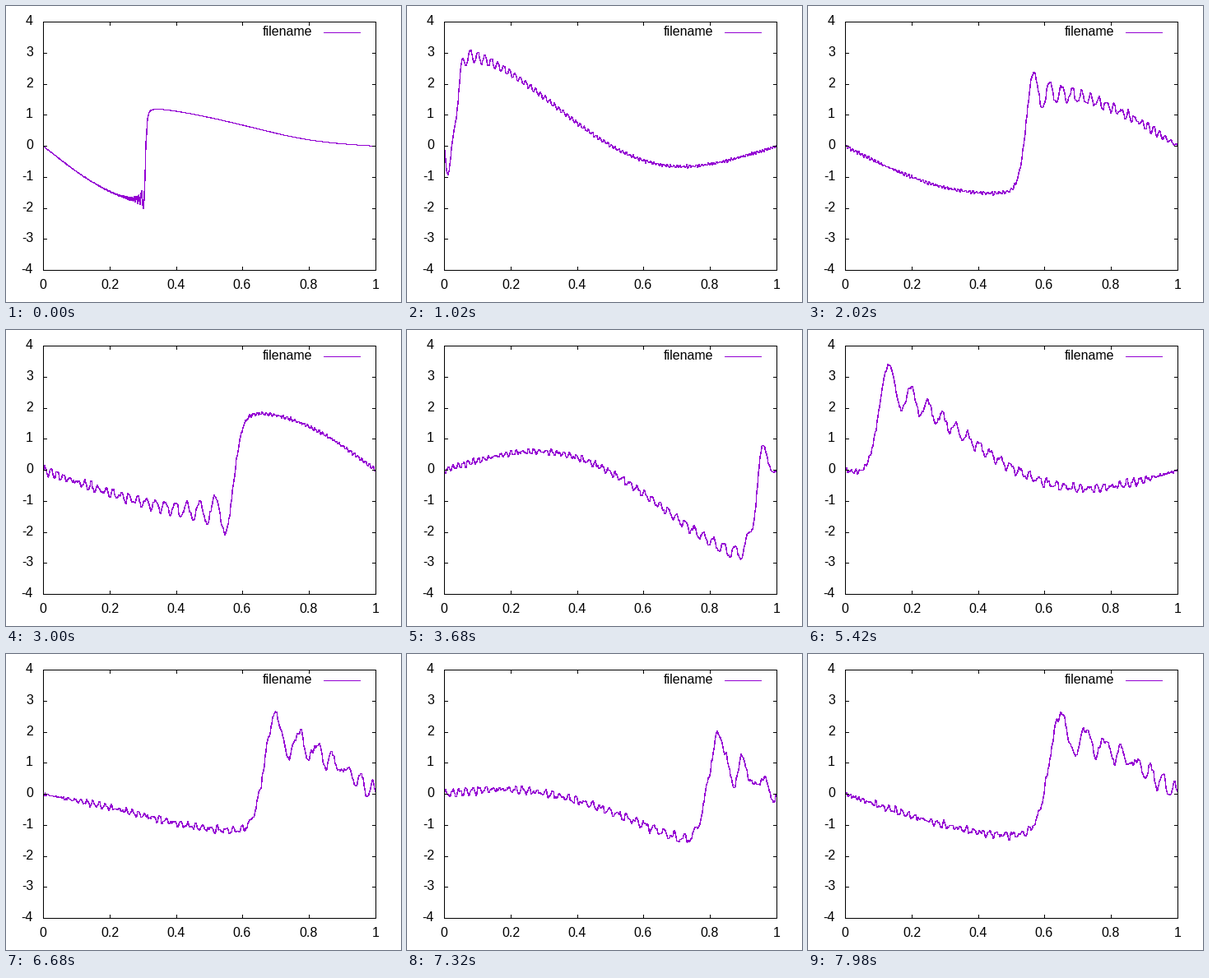
Animation, 480 px wide and 360 px high, one loop 8 s. Source, as a matplotlib script:

```python
import numpy as np
import matplotlib.pyplot as plt
from matplotlib.animation import FuncAnimation
from matplotlib.collections import LineCollection

W, H, DPI = 480, 360, 100
FRAMES, INTERVAL = 400, 20
LEFT, RIGHT, TOP, BOTTOM = 45, 449, 19, 321
PX = 72 / DPI  # one pixel in points
PURPLE = "#9400d3"

plt.rcParams["font.family"] = "Liberation Sans"
plt.rcParams["font.size"] = 16 * PX
plt.rcParams["path.simplify"] = False

# String fixed at both ends, released from rest, on a leapfrog grid.
CELLS = 1000
COURANT = 0.36
SPEED = 0.30852  # string lengths travelled per frame
SOFT = 0.0013    # softens the step at the left end

x = np.arange(CELLS + 1) / CELLS
n = np.arange(1, CELLS)
inner = x[1:-1]
modes = np.sin(np.pi * np.outer(n, inner))
start = np.sin(2 * np.pi * inner) / (2 * (inner + SOFT))
amps = 2 / CELLS * modes @ start
steps = SPEED * CELLS / COURANT
omega = 2 * steps * np.arcsin(COURANT * np.sin(np.pi * n / (2 * CELLS)))


def to_px(v):
    return LEFT + (RIGHT - LEFT) * v


def to_py(v):
    return BOTTOM - (BOTTOM - TOP) * (v + 4) / 8


def center(v):
    """Centre of the nearest pixel."""
    return np.floor(np.asarray(v) + 0.5) + 0.5


def shape(t):
    u = np.zeros(CELLS + 1)
    u[1:-1] = (amps * np.cos(omega * t)) @ modes
    return u


fig = plt.figure(figsize=(W / DPI, H / DPI), dpi=DPI, facecolor="white")
ax = fig.add_axes([0, 0, 1, 1])
ax.set_xlim(0, W)
ax.set_ylim(H, 0)
ax.axis("off")

l, r, t, b = (v + 0.5 for v in (LEFT, RIGHT, TOP, BOTTOM))
border = [[(l, t), (r, t), (r, b), (l, b), (l, t), (r, t)]]

for k in range(6):
    px = float(center(to_px(k / 5)))
    border += [[(px, b), (px, b - 4.5)], [(px, t), (px, t + 4.5)]]
    ax.text(px - 0.5, 344, f"{k / 5:g}", ha="center", va="baseline")

for v in range(-4, 5):
    py = float(center(to_py(v)))
    border += [[(l, py), (l + 4.5, py)], [(r, py), (r - 4.5, py)]]
    ax.text(33, py + 3.5, str(v), ha="right", va="baseline")

lines = LineCollection(border, colors="black", linewidths=PX,
                       antialiaseds=False, zorder=3)
lines.set_snap(False)
ax.add_collection(lines)

ax.text(372, 36, "filename", ha="right", va="baseline")
style = dict(color=PURPLE, lw=PX, antialiased=False, snap=False,
             solid_capstyle="butt", zorder=2)
ax.plot([386, 431], [32.5, 32.5], **style)
curve, = ax.plot([], [], **style)
curve_x = center(to_px(x))


def update(i):
    curve.set_data(curve_x, center(to_py(shape(i + 1))))
    return curve,


anim = FuncAnimation(fig, update, frames=FRAMES, interval=INTERVAL,
                     init_func=lambda: update(0), repeat=True, repeat_delay=0,
                     blit=False)
plt.show()
```
